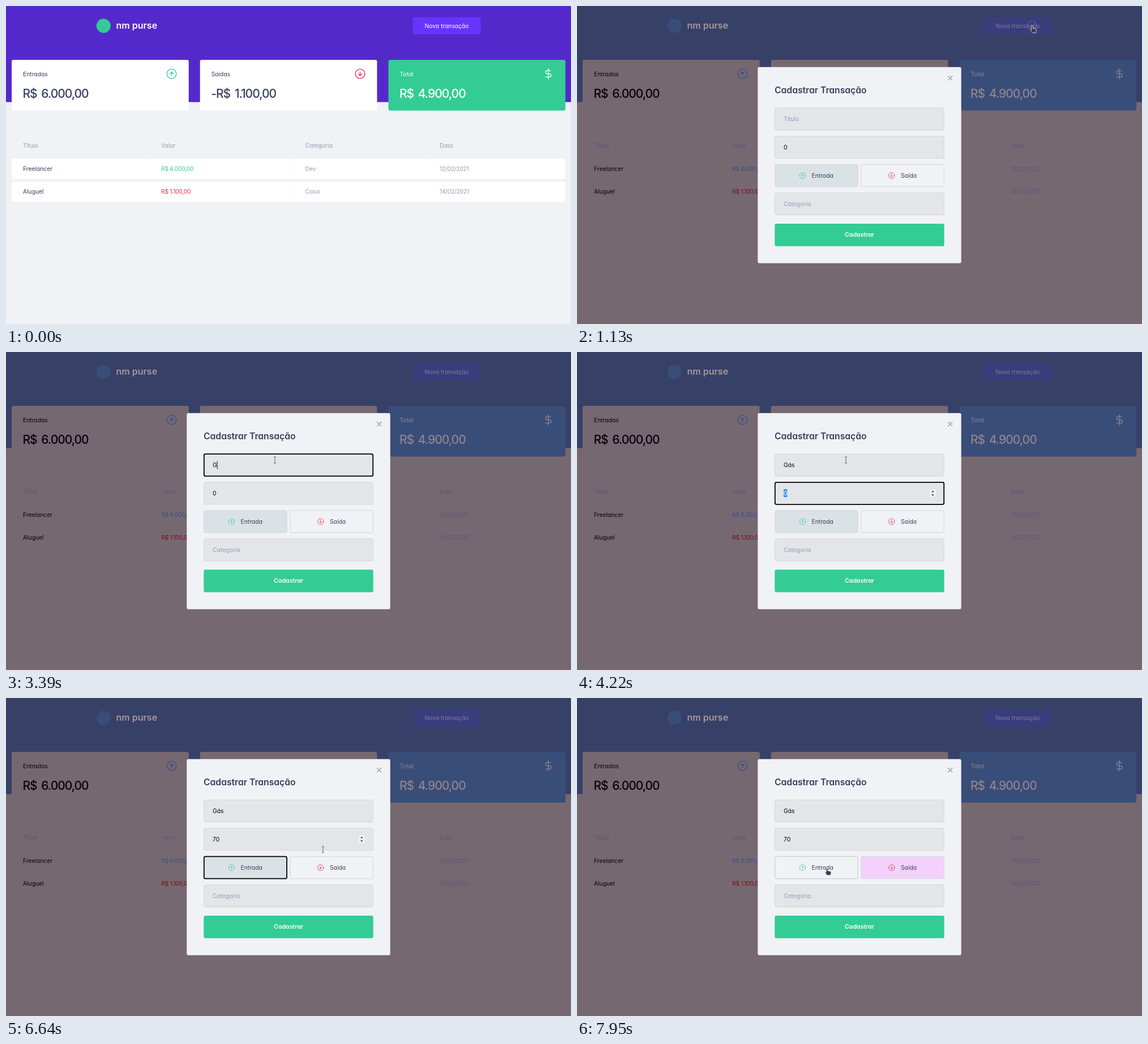
An HTML page for the animation above (8 s loop, 998 by 561 pixels).

```html
<!DOCTYPE html>
<html lang="pt-BR">
<head>
<meta charset="utf-8">
<title>Transações</title>
<style>
html, body { margin: 0; width: 100%; height: 100%; overflow: hidden; }
svg { display: block; width: 998px; height: 561px;
  font: 400 10.3px Inter, "Open Sans", sans-serif; font-feature-settings: "cv11"; }
#page { --head: #5429cc; --bg: #f0f2f5; --card: #fff; --ink: #363f5f; --soft: #969cb3;
  --total: #33cc95; --up: #33cc95; --down: #e52e4d; --btn: #6933ff; --light: #fff; --label: #fff; --onTotal: #fff; }
#page.hover { --btn: #5400ff; }
#page.dim { --head: #374067; --bg: #766871; --card: #766871; --ink: #08000c; --soft: #575a78;
  --total: #394d79; --up: #394f86; --down: #7a0d18; --btn: #383d7c; --light: #a8969d; --label: #85799a; --onTotal: #92838c; }
.big { font-size: 21px; font-weight: 500; letter-spacing: -1px; word-spacing: 3px; }
.line { fill: none; stroke-linecap: round; stroke-linejoin: round; }
.hide { display: none; }
</style>
</head>
<body>
<svg viewBox="0 0 998 561">
  <g id="page"></g>
  <g id="modal"></g>
  <circle id="ring" fill="none" stroke="#8b62f0" stroke-width="1.3"/>
  <g id="cursor">
    <path id="arrow" d="M0 0V11.5L2.8 9l1.8 4 1.9-.8-1.8-3.9H8.4z" fill="#333340" stroke="#fff" stroke-width=".9"/>
    <path id="hand" d="M-1.3 .8Q-1-.4 0-.4T1.4 .8V4.8L6 5.8Q7.6 6.3 7.4 8L6.400 12.800H.5L-3 8.800Q-3.600 7.500-2.300 7.200L-1.300 7.600z" fill="#3a3a48" stroke="#f4f0f4" stroke-width=".8"/>
    <path id="beam" class="line" d="M-1.5-5.3H1.5M0-5.3V5.3M-1.5 5.3H1.5" stroke="#55555c" stroke-width=".9"/>
  </g>
</svg>
<script>
const $ = id => document.getElementById(id);
const LOOP = 8000;

const rect = (x, y, w, h, fill, r = 3, more = "") =>
  `<rect x="${x}" y="${y}" width="${w}" height="${h}" rx="${r}" fill="${fill}" ${more}/>`;
const text = (x, y, str, fill, more = "") =>
  `<text x="${x}" y="${y}" fill="${fill}" ${more}>${str}</text>`;
const icon = (x, y, k, color, d, more = "") =>
  `<g class="line" transform="translate(${x} ${y}) scale(${k})" stroke="${color}" stroke-width="1.6">${more}<path d="${d}"/></g>`;
const disc = '<circle r="10"/>';
const UP = "M-4 0L0-4 4 0M0 4V-4", DOWN = "M-4 0L0 4 4 0M0-4V4";
const DOLLAR = "M0-11V11M5-7H-2.5a3.5 3.5 0 0 0 0 7h5a3.5 3.5 0 0 1 0 7H-6";

function card(x, fill, ink, label, amount, mark) {
  return rect(x, 95, 312.7, 89.5, fill) + text(x + 20, 123.5, label, ink) +
    text(x + 19.5, 161.7, amount, ink, 'class="big"') + mark;
}

const COLS = [10, 254, 508.5, 746, 988];
function row(y, cells, inks) {
  return cells.map((c, i) =>
    rect(COLS[i], y, COLS[i + 1] - COLS[i], 35.7, "var(--card)", 2.5) +
    text(COLS[i] + 20, y + 21.3, c, inks[i], i == 1 || i == 3 ? 'letter-spacing="-.25"' : "")).join("");
}

const soft = "var(--soft)", ink = "var(--ink)";
$("page").innerHTML =
  rect(0, 0, 998, 561, "var(--bg)", 0) + rect(0, 0, 998, 169.5, "var(--head)", 0) +
  '<circle cx="172.3" cy="35" r="12.5" fill="var(--total)"/>' +
  text(194.5, 40.2, "nm purse", "var(--light)", 'font-size="16" font-weight="600"') +
  rect(718.5, 20, 120, 30, "var(--btn)") +
  text(778.5, 38.7, "Nova transação", "var(--label)", 'text-anchor="middle"') +
  card(10, "var(--card)", ink, "Entradas", "R$ 6.000,00", icon(292.5, 119.6, .83, "var(--up)", UP, disc)) +
  card(342.7, "var(--card)", ink, "Saídas", "-R$ 1.100,00", icon(625.5, 119.6, .83, "var(--down)", DOWN, disc)) +
  card(675.5, "var(--total)", "var(--onTotal)", "Total", "R$ 4.900,00", icon(958, 119.6, .83, "var(--onTotal)", DOLLAR)) +
  ["Título", "Valor", "Categoria", "Data"].map((s, i) => text(COLS[i] + 20, 250, s, soft)).join("") +
  row(269.5, ["Freelancer", "R$ 6.000,00", "Dev", "12/02/2021"], [ink, "var(--up)", soft, soft]) +
  row(310, ["Aluguel", "R$ 1.100,00", "Casa", "14/02/2021"], [ink, "var(--down)", soft, soft]);

const FIELD = "#e4e5e9", PLAIN = "#f0f2f5", NAVY = "#363f5f", HINT = "#969cb3", EDGE = "#d3d5d9";
const LEFT = 349.3, WIDE = 299.4, HALF = 147.2;
const box = (id, x, y, w, fill) =>
  rect(x + .5, y + .5, w - 1, 39, fill, 2.5, `id="${id}" stroke="${EDGE}"`);
$("modal").innerHTML =
  rect(319.3, 107.8, 359.4, 346, PLAIN) +
  '<path class="line" d="M655.5 123.5l7.4 7.4m0-7.4l-7.4 7.4" stroke="#92949e" stroke-width="1.2"/>' +
  text(349, 154.2, "Cadastrar Transação", NAVY, 'font-size="15.7" font-weight="600"') +
  box("title", LEFT, 179.4, WIDE, FIELD) + box("value", LEFT, 229.3, WIDE, FIELD) +
  box("in", LEFT, 279.2, HALF, "#dae2e5") + box("out", LEFT + WIDE - HALF, 279.2, HALF, PLAIN) +
  box("cat", LEFT, 329.1, WIDE, FIELD) +
  '<rect id="sel" x="365" y="242" width="6.3" height="14" fill="#3390ff"/>' +
  text(365, 202.7, "", "#000", 'id="titleText"') + text(365, 252.6, "", "#000", 'id="valueText"') +
  '<g id="spin"><rect x="623.5" y="242.5" width="10" height="13" fill="#f3f3f3"/>' +
  '<path d="M626 247.3l2.3-2.8 2.3 2.8zM626 251.2l2.3 2.8 2.3-2.8z" fill="#333"/></g>' +
  '<rect id="caret" width=".9" height="14" fill="#000"/>' +
  icon(398.5, 299.2, .52, "#33cc95", UP, disc) + text(414.5, 302.7, "Entrada", NAVY) +
  icon(555.7, 299.2, .52, "#e52e4d", DOWN, disc) + text(572, 302.7, "Saída", NAVY) +
  text(365, 352.6, "Categoria", HINT) +
  rect(LEFT, 384, WIDE, 39.8, "#33cc95") +
  text(499, 407.3, "Cadastrar", "#fff", 'text-anchor="middle" font-size="10.6" font-weight="600"');

const out3 = p => 1 - (1 - p) ** 3, inOut = p => p * p * (3 - 2 * p);
// start, end, from, bend, to, easing
const MOVES = [
  [240, 730, [790, 160], [800, 90], [804, 34.5], out3],
  [1190, 1750, [804, 34.5], [560, 235], [475, 190.5], inOut],
  [6515, 6900, [475, 190.5], [536, 246], [597, 301], out3],
  [7500, 7950, [597, 301], [520, 306], [441.5, 300], inOut]
];
const CLICKS = [870, 1950, 7240];
const TITLE = [[0, "Título"], [3390, "G"], [3680, "Gá"], [3950, "Gás"]];
const VALUE = [[0, "0"], [5170, "7"], [5430, "70"]];
const FOCUS = [[0, ""], [1990, "title"], [4220, "value"], [6020, "in"], [7260, ""]];

const at = (steps, t) => steps.filter(s => s[0] <= t).pop()[1];
const show = (id, on) => $(id).classList.toggle("hide", !on);
const inside = ([x, y], l, t, r, b) => x > l && x < r && y > t && y < b;

function pointer(t) {
  const [a, b, p, q, r, ease] = MOVES.filter(m => m[0] <= t).pop() || MOVES[0];
  const k = ease(Math.min(1, Math.max(0, (t - a) / (b - a))));
  return [0, 1].map(i => (1 - k) ** 2 * p[i] + 2 * k * (1 - k) * q[i] + k * k * r[i]);
}

function draw(t) {
  const pos = pointer(t), open = t >= 1120, focus = at(FOCUS, t);
  const onBtn = !open && t >= 260 && inside(pos, 718, 20, 839, 50);
  $("page").classList.toggle("hover", onBtn);
  $("page").classList.toggle("dim", open);
  show("modal", open);

  const title = at(TITLE, t), empty = title == "Título";
  $("titleText").textContent = title;
  $("titleText").setAttribute("fill", empty ? HINT : "#000");
  $("valueText").textContent = at(VALUE, t);
  const selected = focus == "value" && t < 5170;
  show("sel", selected);
  $("valueText").setAttribute("fill", selected ? "#fff" : "#000");

  const overValue = open && inside(pos, 349, 229, 649, 269);
  show("spin", focus == "value" || overValue);

  const overIn = open && inside(pos, 349, 279, 497, 319);
  const overOut = open && inside(pos, 501, 279, 649, 319);
  const hovered = { in: overIn, out: overOut };
  for (const id of ["title", "value", "in", "out"]) {
    const on = focus == id;
    $(id).setAttribute("stroke", on ? "#000" : hovered[id] ? "#c4c6c8" : EDGE);
    $(id).setAttribute("stroke-width", on ? 1.8 : 1);
  }
  const spent = t >= 7300;
  $("in").setAttribute("fill", spent ? PLAIN : "#dae2e5");
  $("out").setAttribute("fill", spent ? "#f3d1fb" : PLAIN);

  const typing = focus == "title" || focus == "value" && !selected;
  show("caret", typing && !(t >= 2490 && t < 3060));
  if (typing) {
    const len = focus == "title" && empty ? 0 : $(focus + "Text").getComputedTextLength();
    $("caret").setAttribute("x", 365 + len);
    $("caret").setAttribute("y", focus == "title" ? 192.3 : 242.2);
  }

  const hand = onBtn || overIn || overOut || open && t < 1190;
  const beam = open && !hand && (overValue || inside(pos, 349, 179, 649, 220) || inside(pos, 349, 329, 649, 369));
  show("cursor", t >= 260);
  show("hand", hand);
  show("beam", beam);
  show("arrow", !hand && !beam);
  $("cursor").setAttribute("transform", `translate(${pos})`);

  const click = CLICKS.find(c => t >= c && t < c + 360);
  show("ring", click);
  if (click) {
    const p = (t - click) / 360, spot = pointer(click);
    $("ring").setAttribute("cx", spot[0]);
    $("ring").setAttribute("cy", spot[1]);
    $("ring").setAttribute("r", 8 * out3(p));
    $("ring").setAttribute("opacity", 1 - p * p);
  }
}

function tick() {
  draw(performance.now() % LOOP);
  requestAnimationFrame(tick);
}
tick();
</script>
</body>
</html>
```
